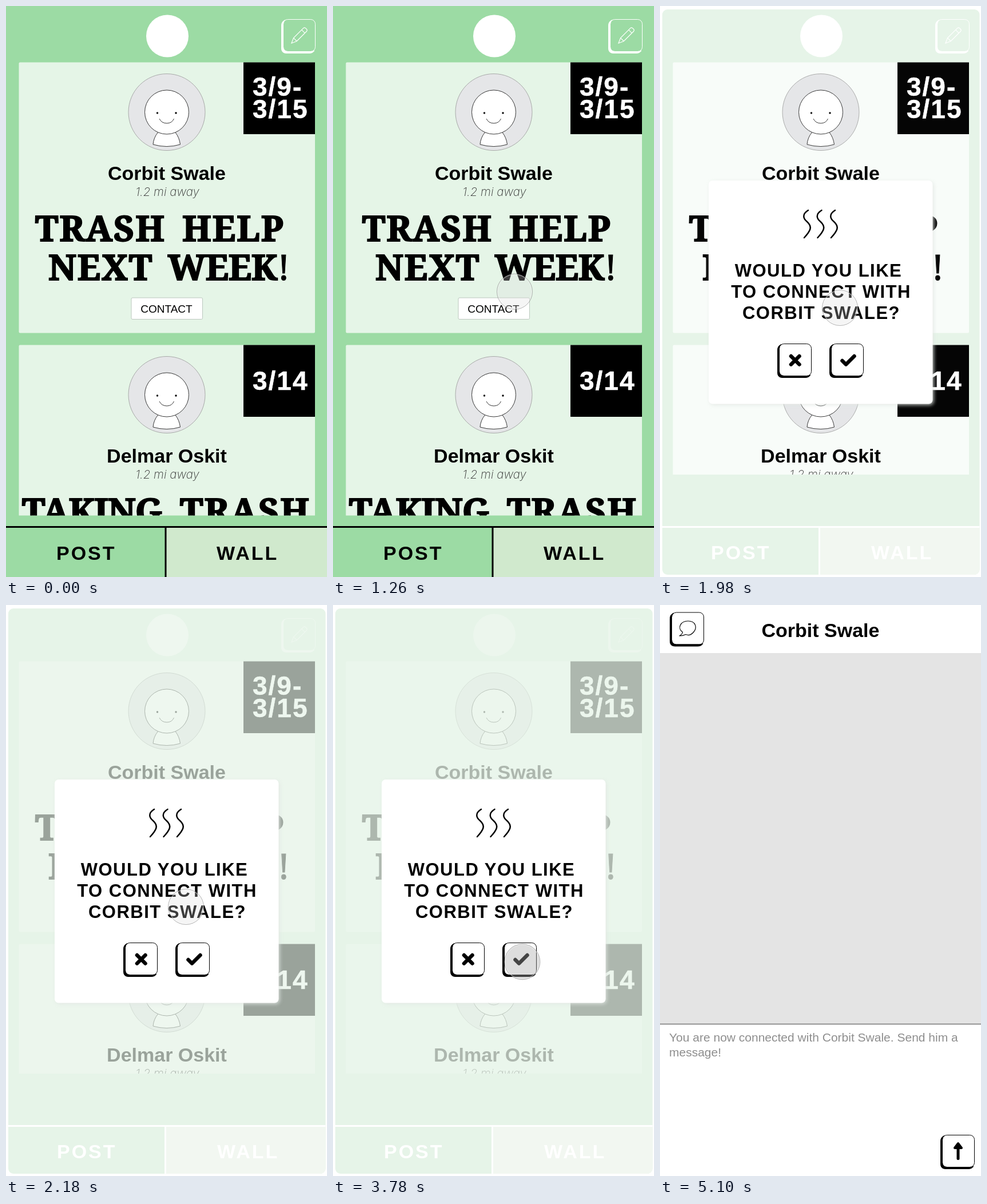
These frames come from a looping animation (561 by 998 pixels, 6.56 s). An HTML page:

```html
<!DOCTYPE html>
<html lang="en">
<head>
<meta charset="utf-8">
<title>Neighbour board</title>
<style>
  html, body { margin: 0; width: 100%; height: 100%; overflow: hidden; background: #fff; }
  svg { display: block; width: 100vw; height: 100vh; }
  text { font-family: "Liberation Sans", Arial, sans-serif; white-space: pre; }
  .mid { text-anchor: middle; }
  .name { font-size: 34px; font-weight: 700; text-anchor: middle; }
  .dist { font: italic 200 20.5px Inter, Roboto, sans-serif; fill: #333; text-anchor: middle; }
  .date { font-size: 46px; font-weight: 700; letter-spacing: 2px; fill: #fff; stroke: #fff; stroke-width: .6; }
  .tab { font-size: 34px; font-weight: 700; letter-spacing: 3px; }
  .ask { font-size: 31px; font-weight: 700; letter-spacing: 1.5px; text-anchor: middle; }
  .note { font-size: 21px; fill: #8e8e8e; }
  .slab text { font: 700 62px "Noto Serif", serif; letter-spacing: 2px; stroke: #000; stroke-width: 2; }
  .line { fill: none; stroke: #000; stroke-linecap: round; stroke-linejoin: round; }
  #modal { filter: drop-shadow(2px 2px 3px rgba(225, 230, 226, .8)); }
</style>
</head>
<body>
<svg viewBox="0 0 561 998" preserveAspectRatio="none">
  <defs>
    <clipPath id="tall"><rect width="561" height="890.5"/></clipPath>
    <clipPath id="short"><rect width="561" height="819"/></clipPath>
    <clipPath id="panel"><rect x="4" y="6" width="554.5" height="988" rx="9"/></clipPath>

    <g id="key" stroke="currentColor">
      <rect x="3.5" y=".5" width="56" height="56" rx="8"/>
      <path d="M7 1.500Q.5 4 .5 11V51Q.5 59.500 9 59.500H49Q55 59.500 58 55Q56 56.500 51.500 56.500H11.500Q3.500 56.500 3.500 48.500V8.500Q3.500 4 7 1.500Z" fill="currentColor"/>
    </g>

    <g id="avatar">
      <circle cx="281" cy="185.5" r="67" fill="#e5e6e8" stroke="#999" stroke-width=".8"/>
      <g fill="#fff" stroke="#222" stroke-width=".9">
        <path d="M265.500 221Q258 230 257 242Q281 249 304.500 242Q303 230 296 221"/>
        <circle cx="281" cy="185.500" r="38.500"/>
        <path d="M268 197Q272 205 281 205T293.500 197" fill="none"/>
      </g>
      <circle cx="264.500" cy="187" r="1.700"/>
      <circle cx="297" cy="187" r="1.700"/>
    </g>

    <g id="card">
      <rect x="22.500" y="98.500" width="517.500" height="473" rx="2" fill="#fff" fill-opacity=".74"/>
      <rect x="415" y="98.500" width="125" height="125.500"/>
      <use href="#avatar"/>
      <text class="dist" x="282" y="332">1.2 mi away</text>
    </g>

    <g id="feed">
      <circle cx="282" cy="52.500" r="37" fill="#fff"/>
      <g fill="none" stroke="#fff" color="#fff">
        <use href="#key" x="481" y="23"/>
        <path d="M0 0L9 -4H33Q36 -4 36 -1V1Q36 4 33 4H9ZM9 -4V4M29 -4V4"
              transform="translate(499 65) rotate(-45)" stroke-width="1.200"/>
      </g>

      <use href="#card"/>
      <text class="date" x="431" y="157">3/9-</text>
      <text class="date" x="431" y="196">3/15</text>
      <text class="name" x="281" y="304">Corbit Swale</text>
      <g class="slab">
        <text x="51" y="411">TRASH</text>
        <text x="308" y="411">HELP</text>
        <text x="74" y="478.500">NEXT</text>
        <text x="283" y="478.500" style="letter-spacing:-.5px">WEEK</text>
        <text x="475" y="478.500" style="font-weight:400;stroke-width:1">!</text>
      </g>
      <rect x="219" y="510" width="124.500" height="37.500" rx="2" fill="#fff" stroke="#bcc8be"/>
      <text class="mid" x="280.500" y="535.500" font-size="19">CONTACT</text>

      <use href="#card" y="494"/>
      <text class="date" x="431" y="671">3/14</text>
      <text class="name" x="281" y="798">Delmar Oskit</text>
      <g class="slab">
        <text x="28" y="905" style="letter-spacing:-1px">TAKING</text>
        <text x="304" y="905">TRASH</text>
      </g>
    </g>

    <g id="tabs">
      <text class="tab" x="88" y="968">POST</text>
      <text class="tab" x="368" y="968">WALL</text>
    </g>
  </defs>

  <g id="wall">
    <rect width="561" height="998" fill="#9cdba4"/>
    <use href="#feed" clip-path="url(#tall)"/>
    <rect x="280" y="911" width="281" height="87" fill="#d0e9cd"/>
    <path d="M0 910.500H561M279 911V998" stroke="#000" stroke-width="3"/>
    <use href="#tabs"/>
  </g>

  <g id="ask">
    <rect width="561" height="998" fill="#fff"/>
    <g clip-path="url(#panel)">
      <rect width="561" height="998" fill="#e6f4e8"/>
      <rect x="279" y="911" width="282" height="87" fill="#f2f7f1"/>
      <path d="M0 910.500H561M278.500 910V998" stroke="#fff" stroke-width="3"/>
      <use href="#tabs" x="1" y="-1" fill="#fff"/>
    </g>
    <g id="faded"><use href="#feed" clip-path="url(#short)"/></g>
    <rect id="modal" x="85" y="305" width="391.500" height="390.500" rx="7" fill="#fff"/>
    <g class="line" stroke-width="2.500">
      <path id="wave" d="M259 357C248 364 250 371 257 377C267 386 263 393 252 405"/>
      <use href="#wave" x="23.500"/>
      <use href="#wave" x="47"/>
    </g>
    <text class="ask" x="277" y="473">WOULD YOU LIKE</text>
    <text class="ask" x="281.500" y="510">TO CONNECT WITH</text>
    <text class="ask" x="282" y="547">CORBIT SWALE?</text>
    <g fill="#fff">
      <use href="#key" x="205" y="590"/>
      <use href="#key" x="296" y="590"/>
    </g>
    <path class="line" stroke-width="6.500" d="M229 612l14.500 14.500m0 -14.500l-14.500 14.500M318.500 620l6.500 6.500l14.500 -14.500"/>
  </g>

  <g id="chat">
    <rect width="561" height="998" fill="#fff"/>
    <rect y="84" width="561" height="648" fill="#e4e4e4"/>
    <path d="M0 732.500H561" stroke="#777" stroke-width="1.500"/>
    <text class="name" x="280.500" y="56">Corbit Swale</text>
    <text class="note" x="16" y="763">You are now connected with Corbit Swale. Send him a</text>
    <text class="note" x="16" y="789">message!</text>
    <g fill="#fff">
      <use href="#key" x="17" y="12.500"/>
      <use href="#key" x="490" y="926"/>
    </g>
    <path class="line" stroke-width="1.200" d="M39.500 47.500C30 41 35 28 49 28S65 40 59 47S49 53 45 51.500Q40 54 34 54Q39 51 39.500 47.500Z"/>
    <path d="M521 941l-6 8h12z" stroke="#000" stroke-width="4" stroke-linejoin="round"/>
    <path class="line" stroke-width="5" d="M521 946V967.500"/>
  </g>

  <g id="touch">
    <circle id="pad" r="31"/>
    <circle r="30" fill="none" stroke="#fff" stroke-opacity=".6"/>
    <circle r="31" fill="none" stroke="#777" stroke-opacity=".55"/>
  </g>
</svg>
<script>
const LOOP = 6560;
const $ = id => document.getElementById(id);
const [wall, ask, chat, faded, touch, pad] =
  ["wall", "ask", "chat", "faded", "touch", "pad"].map($);

const easeOut = p => u => 1 - (1 - u) ** p;
const easeIn = u => u * u;
const easeInOut = u => u < .5 ? 2 * u * u : 1 - 2 * (1 - u) ** 2;

// start, end, from, to, easing of x and y
const moves = [
  [440, 1520, [394, -35], [314.5, 527.5], easeOut(2.3), easeOut(2.1)],
  [2600, 3140, [314.5, 527.5], [330.8, 623.7], easeInOut, easeInOut],
  [4700, 5100, [330.8, 623.7], [600, 462], easeIn, easeIn]
];

const show = (el, on) => el.setAttribute("visibility", on ? "visible" : "hidden");
const within = (t, a, b) => t >= a && t < b;

function touchAt(t) {
  let i = 0;
  while (i < moves.length - 1 && t >= moves[i + 1][0]) i++;
  const [start, end, from, to, ex, ey] = moves[i];
  const u = Math.min(1, Math.max(0, (t - start) / (end - start)));
  return [from[0] + (to[0] - from[0]) * ex(u), from[1] + (to[1] - from[1]) * ey(u)];
}

function fadeAt(t) {
  if (t >= 2280) return .25;
  const u = Math.max(0, (Math.min(t, 2180) - 1976) / 304);
  return 1 - .75 * easeOut(2)(u);
}

function draw(now) {
  const t = Math.floor((now % LOOP) / 20) * 20;
  show(wall, t < 1980);
  show(ask, within(t, 1980, 4020));
  show(chat, t >= 4020);
  faded.setAttribute("opacity", fadeAt(t));

  show(touch, within(t, 460, 5100));
  touch.setAttribute("transform", `translate(${touchAt(t)})`);
  const pressed = within(t, 1760, 1980) || within(t, 3780, 4020);
  pad.setAttribute("fill", pressed ? "rgba(170,170,170,.4)" : "rgba(218,218,218,.27)");
}

const begin = performance.now();
function tick() {
  draw(performance.now() - begin);
  requestAnimationFrame(tick);
}
tick();
</script>
</body>
</html>
```
